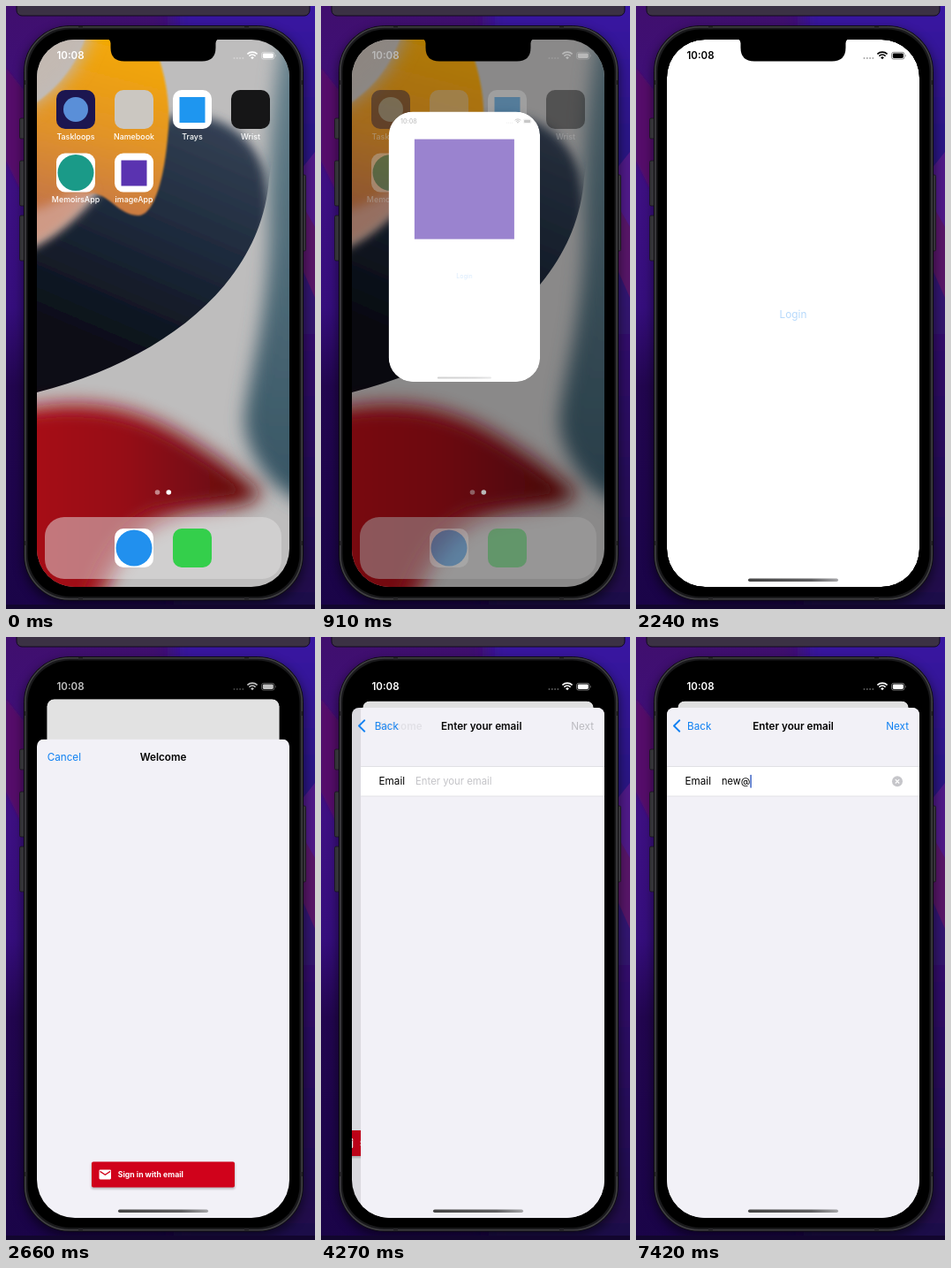
An HTML page that plays this animation: 350x682 px, repeating every 8000 ms.

```html
<!DOCTYPE html>
<html lang="en">
<head>
<meta charset="utf-8">
<title>Sign-in flow</title>
<style>
  html, body { margin: 0; width: 100%; height: 100%; overflow: hidden; background: #1c0648; }
  svg { display: block; width: 350px; height: 682px; }
  text { font-family: Inter, "Open Sans", sans-serif; font-size: 11.7px; white-space: pre; }
  .semi { font-weight: 600; }
  .mid { text-anchor: middle; }
  .blue { fill: #0f80f2; }
  .label { font-size: 8.9px; font-weight: 500; fill: #fff; text-anchor: middle; }
</style>
</head>
<body>
<svg viewBox="0 0 350 682" xmlns="http://www.w3.org/2000/svg">
  <defs>
    <linearGradient id="desk" x2="0" y2="1">
      <stop offset="0" stop-color="#400f6e"/><stop offset=".3" stop-color="#3d1082"/><stop offset=".5" stop-color="#350e7c"/>
      <stop offset=".63" stop-color="#22064f"/><stop offset="1" stop-color="#1a0448"/>
    </linearGradient>
    <linearGradient id="deskR" x2="0" y2="1">
      <stop offset="0" stop-color="#3c18a8"/><stop offset=".25" stop-color="#2a1984"/>
      <stop offset=".5" stop-color="#32126e"/><stop offset="1" stop-color="#1c0844"/>
    </linearGradient>
    <linearGradient id="navy" gradientUnits="userSpaceOnUse" x1="250" y1="120" x2="130" y2="400">
      <stop offset="0" stop-color="#364357"/><stop offset=".5" stop-color="#1e2a3c"/><stop offset="1" stop-color="#090d16"/>
    </linearGradient>
    <linearGradient id="amber" gradientUnits="userSpaceOnUse" x1="150" y1="40" x2="95" y2="250">
      <stop offset="0" stop-color="#f5aa02"/><stop offset=".55" stop-color="#e0922a"/><stop offset="1" stop-color="#c2734a"/>
    </linearGradient>
    <linearGradient id="teal" x2="0" y2="1">
      <stop offset="0" stop-color="#68838e"/><stop offset="1" stop-color="#365463"/>
    </linearGradient>
    <linearGradient id="red">
      <stop offset="0" stop-color="#ac0a12"/><stop offset=".5" stop-color="#961018"/><stop offset="1" stop-color="#64100f"/>
    </linearGradient>
    <linearGradient id="bar">
      <stop offset="0" stop-color="#444"/><stop offset=".7" stop-color="#606062"/><stop offset="1" stop-color="#a5a5a8"/>
    </linearGradient>
    <filter id="b1"><feGaussianBlur stdDeviation=".8"/></filter>
    <filter id="b6" x="-30%" y="-30%" width="160%" height="160%"><feGaussianBlur stdDeviation="6"/></filter>
    <filter id="b10" x="-40%" y="-40%" width="180%" height="180%"><feGaussianBlur stdDeviation="10"/></filter>
    <clipPath id="screen"><rect x="35" y="38" width="286" height="619" rx="43"/></clipPath>
    <clipPath id="navyClip"><path d="M0 0H330L298 195C290 312 180 400 35 437L0 445Z"/></clipPath>
    <clipPath id="winClip"><rect id="winClipBox"/></clipPath>
    <clipPath id="sheetClip"><path d="M35 700V8a8 8 0 0 1 8-8H313a8 8 0 0 1 8 8V700Z"/></clipPath>

    <g id="status">
      <text class="semi" x="57.5" y="60" style="font-size:11.5px">10:08</text>
      <g opacity=".35"><circle cx="258.5" cy="59" r="1"/><circle cx="261.8" cy="59" r="1"/><circle cx="265.1" cy="59" r="1"/><circle cx="268.4" cy="59" r="1"/></g>
      <path d="M279 60.3l-1.9-2.1a2.8 2.8 0 0 1 3.8 0Z"/>
      <path d="M275.4 56.6a5.2 5.2 0 0 1 7.2 0M273.4 54.4a8.1 8.1 0 0 1 11.2 0" fill="none" stroke="currentColor" stroke-width="1.6"/>
      <rect x="289.5" y="52.3" width="14.5" height="7.8" rx="2.3" fill="none" stroke="currentColor" stroke-width=".8" opacity=".55"/>
      <rect x="290.8" y="53.5" width="12" height="5.4" rx="1.3"/>
      <path d="M305 54.8q1.4 1.4 0 2.8Z" opacity=".6"/>
    </g>
  </defs>

  <!-- desktop -->
  <rect width="350" height="682" fill="url(#desk)"/>
  <path d="M190 -30H380V720H190Z" fill="url(#deskR)" filter="url(#b10)"/>
  <path d="M0 70L20 95V215L0 175Z" fill="#55106a" filter="url(#b1)"/>
  <path d="M330 190L350 165V262L330 225Z" fill="#4f1a88"/>
  <path d="M330 215L350 250V330L330 285Z" fill="#571668"/>
  <rect x="19" y="26" width="319" height="652" rx="52" opacity=".5" filter="url(#b6)"/>
  <rect y="677" width="350" height="5" fill="#12062e"/>
  <rect x="12" y="-12" width="332" height="23" rx="6" fill="#3b3144" stroke="#100a1c"/>

  <!-- phone body -->
  <g fill="#343338" stroke="#17161a" stroke-width=".8">
    <rect x="15.5" y="127" width="7" height="23" rx="1.5"/><rect x="15.5" y="175" width="7" height="51" rx="1.5"/>
    <rect x="15.5" y="237" width="7" height="51" rx="1.5"/><rect x="333" y="191" width="6.5" height="86" rx="1.5"/>
  </g>
  <rect x="20.5" y="22.5" width="316" height="649.5" rx="51" fill="#19191b" stroke="#0c0c0e"/>
  <rect x="21.8" y="23.8" width="313.4" height="647" rx="50" fill="none" stroke="#403f43" stroke-width="1.6"/>
  <path d="M82 23h5v2.5h-5ZM270 23h5v2.5h-5ZM82 669h5v2.5h-5ZM270 669h5v2.5h-5ZM21 84h2.5v5H21ZM21 605h2.5v5H21ZM333.5 84h2.5v5h-2.5ZM333.5 605h2.5v5h-2.5Z" fill="#252427"/>
  <rect x="24.5" y="26.5" width="308" height="641.5" rx="48" fill="#000"/>

  <g clip-path="url(#screen)">
    <g id="home">
      <rect x="35" y="38" width="286" height="619" fill="#bebdbd"/>
      <path d="M316 20H350V566C305 556 272 510 270 469C272 425 300 350 298 240C297 180 302 90 316 20Z" fill="url(#teal)" filter="url(#b10)"/>
      <g clip-path="url(#navyClip)">
        <path d="M0 285C80 255 120 190 180 128C235 110 292 150 295 205C315 300 215 430 0 480Z" fill="url(#navy)" filter="url(#b6)"/>
      </g>
      <path d="M0 200L95 185C100 210 70 245 0 278Z" fill="#d5a48e" filter="url(#b10)"/>
      <path d="M92 30H162C180 70 188 110 183 150C178 205 165 238 149 237C128 236 118 215 100 212C80 214 60 236 30 246V112C58 94 80 68 92 30Z" fill="url(#amber)" filter="url(#b1)"/>
      <path d="M20 232C50 232 70 208 98 205C100 214 60 262 20 272Z" fill="#cf9a85" filter="url(#b6)"/>
      <path d="M0 10H100C92 62 66 96 0 128Z" fill="#c3b9b2" filter="url(#b10)"/>
      <path d="M0 460C90 436 150 455 200 484C240 508 270 530 290 549C285 572 230 568 195 578C150 590 125 625 100 690H0Z" fill="url(#red)" opacity=".9" filter="url(#b10)"/>
      <path d="M0 474C90 454 145 470 195 500C235 524 255 538 268 550C235 556 200 558 165 566C125 582 100 620 78 690H0Z" fill="url(#red)" filter="url(#b6)"/>
      <rect x="44" y="578" width="268" height="70" rx="22" fill="#e3e1e1" opacity=".5"/>
      <g id="icons"></g>
      <circle cx="171.5" cy="550" r="2.8" fill="#fff" opacity=".5"/><circle cx="184.3" cy="550" r="2.8" fill="#fff"/>
      <use href="#status" fill="#fff" color="#fff"/>
    </g>
    <rect id="dim" x="35" y="38" width="286" height="619"/>

    <!-- app window, growing from its icon -->
    <g id="card">
      <g clip-path="url(#winClip)">
        <rect id="win" fill="#fff"/>
        <g id="art"><rect x="7.5" y="8" width="29" height="29" fill="#5a33b0"/></g>
        <g id="app"><text id="login" class="blue mid" x="143" y="315" style="font-size:11.8px">Login</text></g>
        <rect id="winBar" y="-9.5" width="102" height="3.6" rx="1.8" fill="url(#bar)"/>
        <rect id="shade" x="35" y="38" width="286" height="619"/>
      </g>
    </g>
    <use id="top" href="#status"/>

    <!-- sheet -->
    <g id="sheet">
      <g id="panel" clip-path="url(#sheetClip)">
        <rect x="35" width="286" height="620" fill="#f2f1f7"/>
        <g id="first">
          <rect x="96.5" y="479" width="163" height="30" rx="2.5" opacity=".22" filter="url(#b1)"/>
          <rect x="97" y="478" width="162" height="29" rx="2" fill="#d0021b"/>
          <rect x="105.5" y="487" width="13.5" height="11" rx="1.3" fill="#fff"/>
          <path d="M106.5 489l5.8 3.8 5.8-3.8" fill="none" stroke="#d0021b" stroke-width="1.3"/>
          <text x="126.8" y="495.5" fill="#fff" style="font-size:8.7px;font-weight:700">Sign in with email</text>
        </g>
        <rect id="veil" x="35" width="286" height="620"/>
        <g id="second">
          <rect x="35" width="290" height="620" fill="#f2f1f7"/>
          <rect x="35" y="66.5" width="290" height="33.5" fill="#fff"/>
          <path d="M35 66.5H325M35 100H325" stroke="#dcdce0" stroke-width=".8"/>
          <text x="55.5" y="87.2">Email</text>
          <text id="hint" x="97" y="87" fill="#c3c3c7" style="font-size:11.3px">Enter your email</text>
          <text id="entry" x="97" y="87" style="font-size:11px"></text>
          <rect id="caret" y="75.8" width="1.5" height="15" rx=".7" fill="#3c63c4"/>
          <g id="clear"><circle cx="296" cy="83.3" r="6" fill="#c6c6ca"/><path d="M293.8 81.1l4.4 4.4m0-4.4l-4.4 4.4" stroke="#fff" stroke-width="1.2"/></g>
        </g>
        <text id="cancel" class="blue" x="46.7" y="24.7">Cancel</text>
        <text id="welcome" class="semi mid" x="178" y="24.7">Welcome</text>
        <g id="nav">
          <path d="M49.3 14.3L43 20.5l6.3 6.2" fill="none" stroke="#0f80f2" stroke-width="1.9" stroke-linecap="round" stroke-linejoin="round"/>
          <text id="back" class="blue" x="58" y="24.7">Back</text>
          <text id="title" class="semi mid" x="178" y="24.7">Enter your email</text>
          <text id="next" x="309" y="24.7" text-anchor="end">Next</text>
        </g>
      </g>
      <rect x="127" y="647.5" width="102" height="3.6" rx="1.8" fill="url(#bar)"/>
    </g>
    <path d="M113 37q5 0 5.5 5v5q0 15.5 15.5 15.5h88q15.5 0 15.5-15.5v-5q.5-5 5.5-5Z"/>
  </g>
</svg>

<script>
const LOOP = 8000, STEP = 70;
const $ = id => document.getElementById(id);
const set = (id, attrs) => { for (const k in attrs) $(id).setAttribute(k, attrs[k]); };
const clamp = x => Math.max(0, Math.min(1, x));
const ramp = (t, from, to) => clamp((t - from) / (to - from));
const mix = (a, b, p) => a + (b - a) * p;
const shown = on => on ? 'visible' : 'hidden';

// Critically damped spring from 0 to 1, at rest from `end` on
function spring(t, start, rate, end) {
  const x = Math.max(0, t - start) / 1000 * rate;
  return t > end ? 1 : 1 - Math.exp(-x) * (1 + x);
}

// name, x, y, tile colour, inner shape, inner colour, id
const apps = [
  ['Taskloops', 57, 95, '#1c1650', 'circle', '#5a8fd8'],
  ['Namebook', 123, 95, '#cbc7c1'],
  ['Trays', 189, 95, '#fff', 'square', '#1e96f0'],
  ['Wrist', 255, 95, '#161617'],
  ['MemoirsApp', 57, 166.5, '#fff', 'circle', '#1a9a88'],
  ['imageApp', 123, 166.5, '#fff', 'square', '#5a33b0', 'photo'],
  ['', 123, 591, '#fff', 'circle', '#2190ee'],
  ['', 189, 591, '#34cf4b']
];
$('icons').innerHTML = apps.map(([name, x, y, tile, shape, color, id]) => {
  const inner = shape === 'circle' ? `<circle cx="22" cy="22" r="${tile === '#fff' ? 20.5 : 14}" fill="${color}"/>`
    : shape ? `<rect x="7.5" y="8" width="29" height="29" fill="${color}"/>` : '';
  return `<g ${id ? `id="${id}"` : ''} transform="translate(${x} ${y})">
    <rect width="44" height="44" rx="10" fill="${tile}"/>${inner}
    <text class="label" x="22" y="55.5">${name}</text></g>`;
}).join('');

const typed = [[6580, 'n'], [6720, 'ne'], [6930, 'new'], [7420, 'new@']];

function drawWindow(t, lift) {
  const p = spring(t, 803, 16.5, 1470), q = spring(t, 812, 15.7, 1470);
  const w = mix(44, 286, p), h = mix(44, 619, q);
  const x = mix(145, 178, p) - w / 2, y = mix(188.5, 347.5, p) - h / 2;
  const rx = lift > 0 ? mix(43, 9, clamp(lift * 3)) : mix(10, 43, p);
  const box = { x, y, width: w, height: h, rx };
  const open = t >= 803, k = w / 286, s = 1 - .0839 * lift;

  set('home', { visibility: shown(p < 1) });
  set('photo', { opacity: open ? 0 : t >= 700 ? .7 : 1 });
  set('icons', { opacity: 1 - ramp(p, .2, .8) });
  set('dim', { opacity: p === 1 ? 1 : .52 * p });
  set('card', {
    visibility: shown(open),
    transform: `translate(${178 * (1 - s)} ${38 * (1 - s) + 34.4 * lift}) scale(${s})`
  });
  set('win', box);
  set('winClipBox', box);
  set('art', { transform: `translate(${x} ${y}) scale(${w / 44})`, opacity: 1 - ramp(t, 845, 1010) });
  set('app', { transform: `translate(${x} ${y}) scale(${k})` });
  set('login', { opacity: t >= 2240 && t < 2380 ? .3 : ramp(t, 850, 1230) });
  set('winBar', { transform: `translate(${x + 92 * k} ${y + h}) scale(${k})`, opacity: lift ? 0 : ramp(t, 880, 1000) });
  set('shade', { opacity: .12 * lift });

  const tone = Math.round(255 * ramp(t, 2350, 2760));
  const ink = `rgb(${tone},${tone},${tone})`;
  set('top', {
    transform: `translate(${x - 35 * k} ${y - 38 * k}) scale(${k})`,
    opacity: ramp(t, 880, 1020), fill: ink, color: ink
  });
}

function drawSheet(t, lift) {
  const push = spring(t, 3957, 16.5, 4550), left = 1 - push;
  set('sheet', { visibility: shown(lift) });
  set('panel', { transform: `translate(0 ${mix(657, 80, lift)})` });
  set('first', { transform: `translate(${-85.8 * push} 0)` });
  set('veil', { opacity: .1 * push });
  set('second', { transform: `translate(${286 * left} 0)`, visibility: shown(push) });
  set('cancel', { opacity: 1 - clamp(push * 2) });
  set('welcome', { transform: `translate(${-93 * push} 0)`, opacity: push === 1 ? 0 : 1 - push * .97 });
  set('nav', { opacity: push });
  set('back', { transform: `translate(${75 * left} 0)` });
  set('title', { transform: `translate(${105 * left} 0)` });

  const word = typed.reduce((now, [at, text]) => t >= at ? text : now, '');
  $('entry').textContent = word;
  set('hint', { opacity: word ? 0 : 1 });
  set('clear', { opacity: word ? 1 : 0 });
  set('next', { fill: word ? '#0f80f2' : '#b9b9be' });
  const blink = t < 5110 ? 0 : t < 6000 ? 1 - ramp(t, 5600, 5810) : ramp(t, 6020, 6160);
  set('caret', { x: 97 + (word ? $('entry').getComputedTextLength() : 0), opacity: blink });
}

function draw(t) {
  const lift = spring(t, 2350, 14.5, 2940);
  drawWindow(t, lift);
  drawSheet(t, lift);
}

const start = performance.now();
let last = -1;
function tick() {
  const t = Math.floor(((performance.now() - start) % LOOP) / STEP) * STEP;
  if (t !== last) draw(last = t);
  requestAnimationFrame(tick);
}
tick();
</script>
</body>
</html>
```
